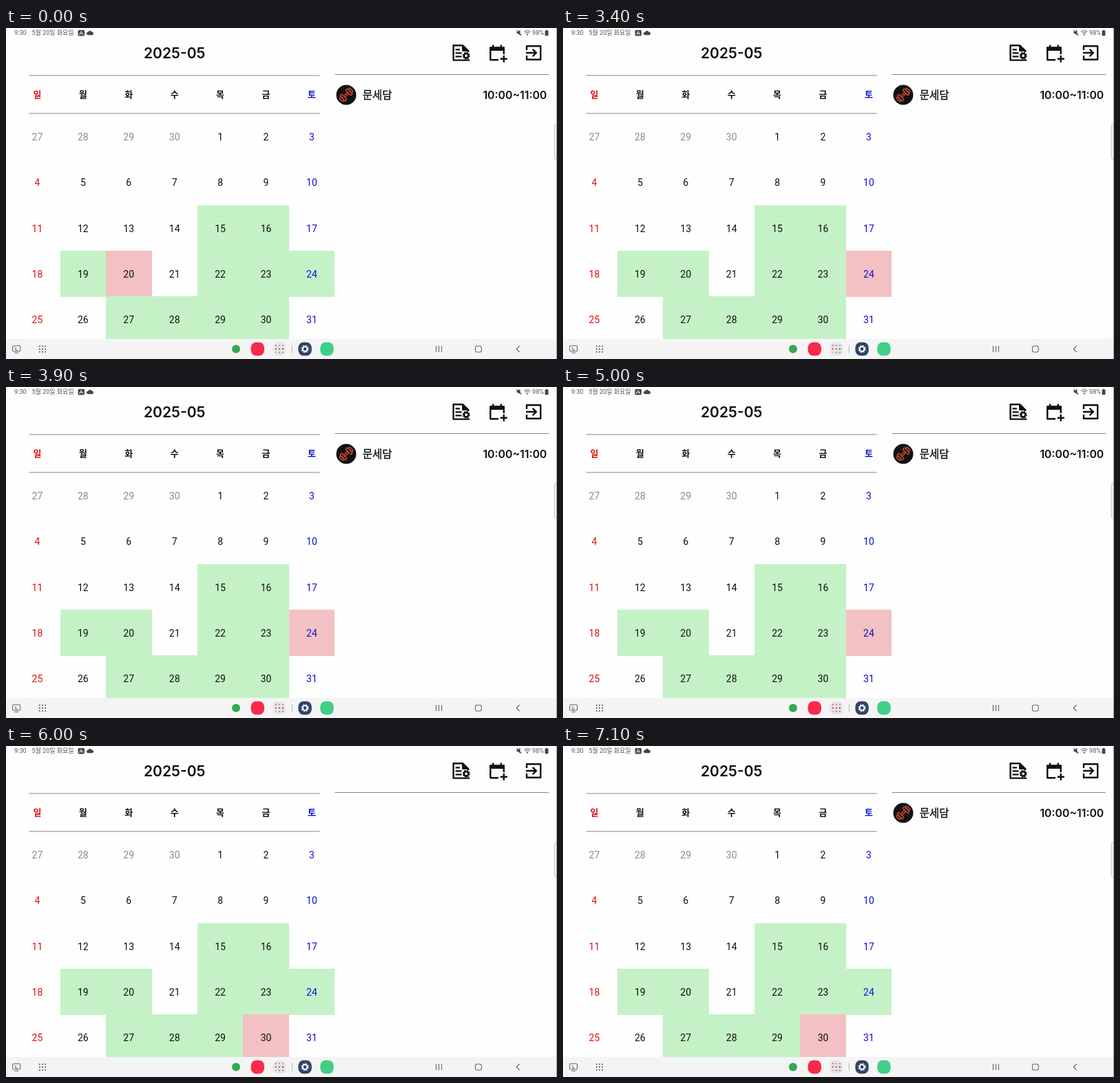
These frames come from a looping animation (800 px wide and 480 px high, 7.2 s). An HTML page:

```html
<!DOCTYPE html>
<html lang="ko">
<head>
<meta charset="utf-8">
<title>Calendar</title>
<style>
  html, body { margin: 0; width: 100%; height: 100%; overflow: hidden; background: #fefefe; }
  svg { display: block; width: 800px; height: 480px; }
  text { fill: #101010; }
  .status { font: 400 9.2px Roboto, "Noto Sans CJK KR", sans-serif; fill: #555; }
  .date { font-size: 9px; }
  .title { font: 600 21px Inter, sans-serif; }
  .head { font: 700 13px "Noto Sans CJK KR", sans-serif; text-anchor: middle; }
  .day { font: 400 14px Roboto, sans-serif; text-anchor: middle; }
  .name { font: 500 15.5px "Noto Sans CJK KR", sans-serif; stroke: #101010; stroke-width: .35; }
  .hours { font: 600 15.8px Inter, sans-serif; text-anchor: end; }
  .rule { stroke: #85858a; stroke-width: 1; }
  .line { fill: none; stroke: #111; stroke-width: 2.4; stroke-linejoin: round; }
  .nav { fill: none; stroke: #666; stroke-width: 1.1; }
</style>
</head>
<body>
<svg viewBox="0 0 800 480">
  <rect width="800" height="480" fill="#fefefe"/>

  <!-- status bar -->
  <text class="status" x="12" y="10.4">9:30</text>
  <text class="status date" x="37.5" y="10.4">5월 20일 화요일</text>
  <rect x="104.5" y="3" width="9.5" height="8.6" rx="1.6" fill="#444"/>
  <path d="M106.3 9.8l2.9-5 2.9 5M107.4 8.2h3.6" fill="none" stroke="#eee"/>
  <path d="M119 10.2a2.1 2.1 0 0 1 .1-4.2 3 3 0 0 1 5.6-.2 2.2 2.2 0 0 1 .3 4.4z" fill="#444"/>
  <path d="M741.5 5.2h2l3-2.5v8l-3-2.6h-2z" fill="#444"/>
  <path d="M741.3 3l7 7.6" stroke="#444" stroke-width="1.1"/>
  <g fill="none" stroke="#666" stroke-width="1.1">
    <path d="M752.4 5.6a6.4 6.4 0 0 1 9 0M754.2 7.5a4 4 0 0 1 5.4 0"/>
    <circle cx="756.9" cy="9.5" r=".7"/>
  </g>
  <text class="status" x="764" y="10.4">98%</text>
  <path d="M783.8 3h2.4v1h1.2v7.2h-4.8V4h1.2z" fill="#444"/>

  <!-- header -->
  <text class="title" x="200" y="44.4">2025-05</text>
  <path class="rule" d="M33.5 68.9H455.5M33.5 123.9H455.5M477.5 67.5H788"/>
  <g class="line">
    <path d="M673.3 46.6H649.6V25.2H663L671.2 33.2V35"/>
    <path d="M662.6 25.4v8h8.4z" fill="#111" stroke-width="1"/>
    <path d="M652.6 31.4h6.4M652.6 36.4h9M652.6 41.4h9"/>
    <circle cx="668.2" cy="40.2" r="3.2" stroke-width="2.6"/>
    <circle cx="668.2" cy="40.2" r="4.7" stroke-width="1.5" stroke-dasharray="2.1 1.59"/>
    <path d="M715 46.2H703.3V28.4H722.8V38"/>
    <path d="M702.2 30.3H723.9" stroke-width="5.4"/>
    <path d="M707.2 24.5v4M718.9 24.5v4"/>
    <path d="M722.8 39.8v10M717.8 44.8h10"/>
    <path d="M756 32V26.2H776.2V45.8H756V40"/>
    <path d="M755 36H769M764.6 30.8L769.8 36 764.6 41.2" stroke-linejoin="miter"/>
  </g>

  <g id="month"></g>

  <!-- booking list -->
  <g id="booking">
    <circle cx="494" cy="96.9" r="14.5" fill="#111216"/>
    <g transform="translate(494 96.9) rotate(-45)" fill="none" stroke="#d5492f" stroke-width="1.4">
      <path d="M-4 -1.3H4M-4 1.3H4"/>
      <rect x="-7.6" y="-5.4" width="3.6" height="10.8" rx="1.2"/>
      <rect x="4" y="-5.4" width="3.6" height="10.8" rx="1.2"/>
      <rect x="-10.6" y="-3.6" width="3" height="7.2" rx="1.2"/>
      <rect x="7.6" y="-3.6" width="3" height="7.2" rx="1.2"/>
    </g>
    <text class="name" x="517.8" y="102.6">문세담</text>
    <text class="hours" x="785.3" y="102.6">10:00~11:00</text>
  </g>

  <rect x="796.2" y="139.5" width="9" height="51" rx="3" fill="#f1f1f3" stroke="#c2c2c6"/>

  <!-- taskbar -->
  <rect y="451" width="800" height="29" fill="#f4f4f4"/>
  <rect class="nav" x="9.7" y="460.8" width="11" height="8.2" rx="1.4"/>
  <path class="nav" d="M14 463v4.2h3.2M12.5 471.3h5.5"/>
  <g id="apps" fill="#555"></g>
  <circle cx="334" cy="465.5" r="6" fill="#34a853"/>
  <rect x="355.6" y="455.8" width="19.4" height="19.4" rx="7.6" fill="#fa2a4b"/>
  <rect x="387.4" y="456" width="19" height="19" rx="7" fill="#e6e6e7"/>
  <g id="folder"></g>
  <path d="M415.5 460v11.5" stroke="#bbb"/>
  <rect x="424.4" y="455.8" width="19.4" height="19.4" rx="7.6" fill="#314568"/>
  <circle cx="434.1" cy="465.5" r="3.4" fill="none" stroke="#fff" stroke-width="2"/>
  <circle cx="434.1" cy="465.5" r="4.8" fill="none" stroke="#fff" stroke-width="1.4" stroke-dasharray="2 1.77"/>
  <rect x="456.3" y="455.8" width="19.4" height="19.4" rx="7.6" fill="#41cf87"/>
  <path class="nav" d="M624.5 461v9M628.5 461v9M632.5 461v9"/>
  <rect class="nav" x="681.5" y="461.2" width="8.8" height="8.8" rx="2.4"/>
  <path class="nav" d="M745.6 461l-4.4 4.5 4.4 4.5"/>
  <rect x="799" width="1" height="480" fill="#999"/>
</svg>

<script>
const LOOP = 7200, CELL = 66.42;
const GREEN = '#c4f2c6', PINK = '#f3c1c3', RED = '#e01010', BLUE = '#1010d8';
const booked = [15, 16, 19, 20, 22, 23, 24, 27, 28, 29, 30];

// [start ms, value]
const picks = [[0, 20], [3400, 24], [5800, 30]];
const fades = [[0, 1], [3500, .5], [3600, 0], [3800, .5], [3900, 1],
               [5900, .5], [6000, 0], [6100, .5], [6200, 1]];

const $ = id => document.getElementById(id);

function add(parent, tag, attrs, text) {
  const el = document.createElementNS('http://www.w3.org/2000/svg', tag);
  for (const key in attrs) el.setAttribute(key, attrs[key]);
  if (text !== undefined) el.textContent = text;
  return parent.appendChild(el);
}

const month = $('month'), cells = {};
const colX = col => 45.4 + col * CELL;
const dayColor = col => col === 0 ? RED : col === 6 ? BLUE : '#101010';

for (const day of booked) {
  const slot = day + 3, row = Math.floor(slot / 7);
  cells[day] = add(month, 'rect', {
    x: (12.3 + slot % 7 * CELL).toFixed(1), y: (123.7 + row * CELL).toFixed(1),
    width: CELL + .1, height: CELL + .1, 'shape-rendering': 'crispEdges'
  });
}

[...'일월화수목금토'].forEach((label, col) =>
  add(month, 'text', { class: 'head', x: colX(col), y: 101.2, style: `fill:${dayColor(col)}` }, label));

for (let slot = 0; slot < 35; slot++) {
  const col = slot % 7, row = Math.floor(slot / 7);
  const fill = slot < 4 ? '#8c8c8c' : dayColor(col);
  add(month, 'text', { class: 'day', x: colX(col), y: 162.8 + row * CELL, style: `fill:${fill}` },
      slot < 4 ? 27 + slot : slot - 3);
}

const dots = ['#d66', '#7a9', '#999', '#e34', '#e34', '#555', '#bbb', '#5a8', '#d56'];
for (let i = 0; i < 9; i++) {
  const col = i % 3, row = Math.floor(i / 3);
  add($('apps'), 'circle', { cx: 48.9 + col * 4.1, cy: 461.5 + row * 4.1, r: 1.05 });
  add($('folder'), 'rect', { x: 390.7 + col * 5, y: 459.4 + row * 5, width: 2.4, height: 2, rx: .8, fill: dots[i] });
}

function valueAt(steps, t) {
  let value;
  for (const [start, v] of steps) if (t >= start) value = v;
  return value;
}

const begin = performance.now();
function draw() {
  const t = Math.max(0, performance.now() - begin) % LOOP;
  const pick = valueAt(picks, t);
  for (const day of booked) cells[day].setAttribute('fill', day === pick ? PINK : GREEN);
  $('booking').setAttribute('opacity', valueAt(fades, t));
  requestAnimationFrame(draw);
}
draw();
</script>
</body>
</html>
```
